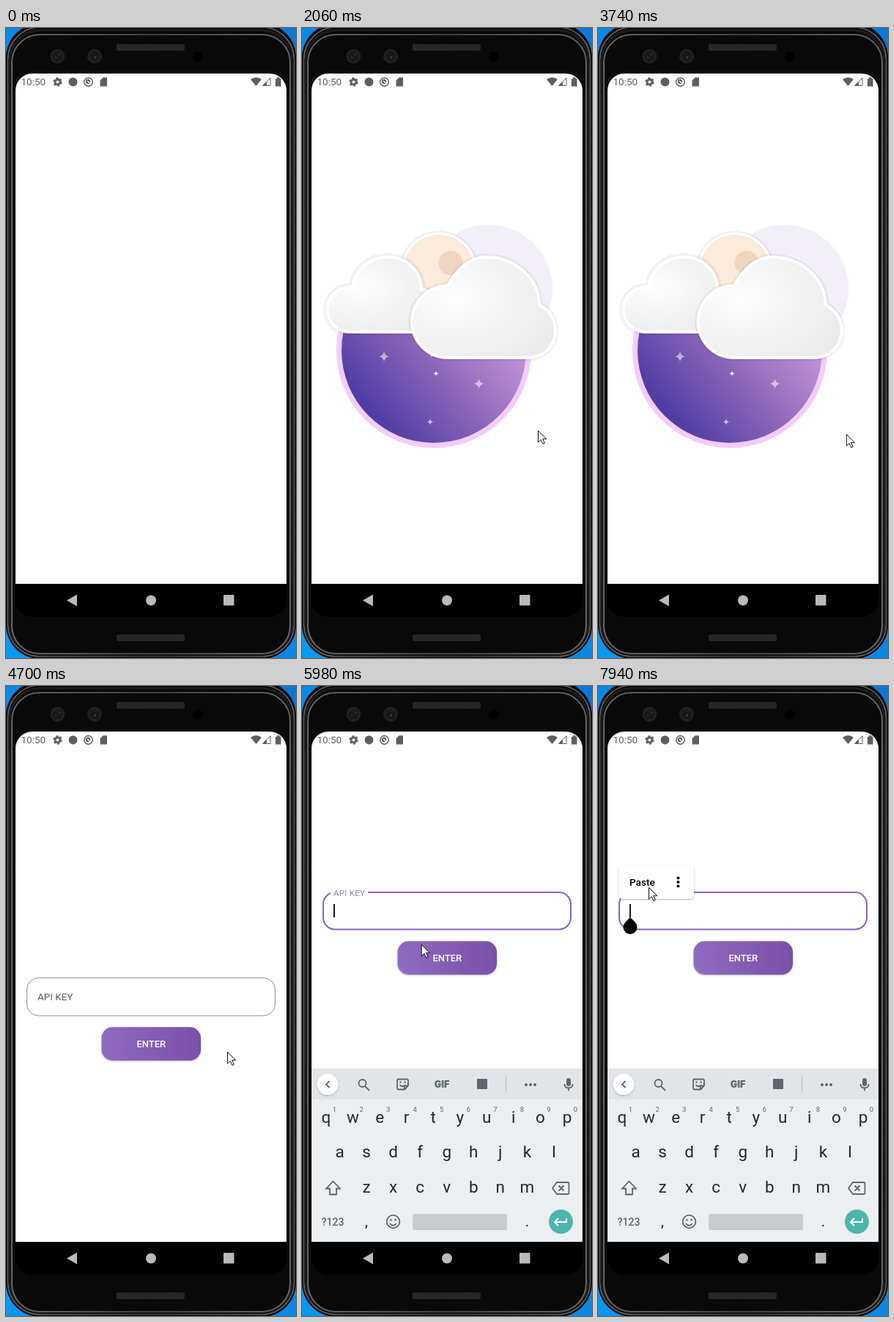
Write an HTML page that moves like this. It is 396 px wide and 858 px high and loops after 8 s.

```html
<!DOCTYPE html>
<html lang="en">
<head>
<meta charset="utf-8">
<style>
  html, body { margin: 0; width: 100%; height: 100%; overflow: hidden; background: #0878d4; }
  svg { display: block; width: 100vw; height: 100vh; font-family: Roboto, sans-serif; }
  .line { fill: none; stroke: #5b676d; stroke-width: 1.8; }
  .mid { text-anchor: middle; }
  .halo { fill: none; stroke: #1c1c40; stroke-opacity: .06; }
</style>
</head>
<body>
<svg viewBox="0 0 396 858">
  <defs>
    <linearGradient id="desk" x1="0" y1="1" x2="1" y2="0"><stop stop-color="#0a98ee"/><stop offset="1" stop-color="#0a78d8"/></linearGradient>
    <linearGradient id="sky" gradientUnits="userSpaceOnUse" x1="95" y1="545" x2="275" y2="395">
      <stop stop-color="#4838a1"/><stop offset=".5" stop-color="#8a66b9"/><stop offset="1" stop-color="#c797d9"/>
    </linearGradient>
    <linearGradient id="violet"><stop stop-color="#8e6bc0"/><stop offset="1" stop-color="#7a50a9"/></linearGradient>
    <radialGradient id="puff" cx=".3" cy=".4" r=".75"><stop stop-color="#fefefe"/><stop offset="1" stop-color="#ebebeb"/></radialGradient>
    <linearGradient id="rim"><stop stop-color="#666"/><stop offset=".5" stop-color="#3c3c3c"/><stop offset="1" stop-color="#666"/></linearGradient>
    <linearGradient id="tail" x1="0" y1="1" x2="1" y2="0"><stop stop-color="#fff" stop-opacity=".1"/><stop offset="1" stop-color="#fff" stop-opacity=".3"/></linearGradient>
    <pattern id="mesh" width="3" height="3" patternUnits="userSpaceOnUse">
      <path fill="#2b2b2b" d="M0 0h3v3h-3z"/><path fill="#171717" d="M0 0h1v1h-1zM1.5 1.5h1v1h-1z"/>
    </pattern>
    <filter id="shadow" x="-10%" y="-20%" width="120%" height="150%"><feDropShadow dx="0" dy="1" stdDeviation="1.2" flood-opacity=".3"/></filter>
    <clipPath id="screen"><rect x="13" y="62" width="370" height="740" rx="23"/></clipPath>
    <path id="front" d="M195 449A49 49 0 0 1 195 351C208 327 226 312 247 312C288 312 320 342 320 377C333 384 342 396 342 412A37 37 0 0 1 305 449Z"/>
    <path id="back" d="M65 414A30.5 30.5 0 0 1 65 353H69C72 329 92 312 117 312C143 312 163 332 163 355C178 360 184 372 184 384A30 30 0 0 1 154 414Z"/>
    <path id="star" fill="#fff" d="M0-7Q1-1 7 0Q1 1 0 7Q-1 1-7 0Q-1-1 0-7"/>
  </defs>

  <!-- phone body -->
  <rect width="396" height="858" fill="url(#desk)"/>
  <rect x="0" y="-6" width="396" height="865" rx="46" fill="#080808"/>
  <g fill="none">
    <rect x="2.5" y="-1" width="391" height="857" rx="44" stroke="url(#rim)" stroke-width="1.5"/>
    <rect x="5" y="3" width="386" height="850" rx="42" stroke="#1c1c1c" stroke-width="3"/>
    <rect x="8" y="9" width="380" height="843" rx="38" stroke="url(#rim)" stroke-width="2"/>
  </g>
  <rect x="10" y="11" width="376" height="840" rx="36" fill="#090909"/>
  <g fill="url(#mesh)"><rect x="151" y="22" width="93" height="9" rx="2"/><rect x="151" y="826" width="93" height="9" rx="2"/></g>
  <g fill="#202020"><circle cx="70.5" cy="38.5" r="10"/><circle cx="121" cy="38.5" r="10"/></g>
  <g fill="#181818"><circle cx="70.5" cy="38.5" r="6.5"/><circle cx="121" cy="38.5" r="6.5"/></g>
  <g fill="#444"><circle cx="68" cy="40" r="1.1"/><circle cx="73" cy="36" r="1"/><circle cx="122" cy="40" r="1.4"/></g>
  <circle cx="262" cy="39" r="7"/>

  <g clip-path="url(#screen)">
    <path d="M13 62h370v740h-370z"/>
    <path fill="#fff" d="M13 62h370v695h-370z"/>

    <!-- status bar -->
    <g fill="#5e5f61">
      <text x="20.5" y="78.3" font-size="13.5">10:50</text>
      <circle cx="70.5" cy="73.5" r="3.5" fill="none" stroke="#5e5f61" stroke-width="3"/>
      <circle cx="70.5" cy="73.5" r="5.3" fill="none" stroke="#5e5f61" stroke-width="1.8" stroke-dasharray="2.775"/>
      <circle cx="91.5" cy="73.5" r="6"/>
      <circle cx="112.5" cy="73.5" r="5.7" fill="none" stroke="#5e5f61" stroke-width="1.5"/>
      <circle cx="112" cy="73" r="3.2"/>
      <path d="M111 72l5 5" stroke="#fff" stroke-width="1.2"/>
      <path d="M132.500 67.500h5.500v12h-9.500v-8zM334 70Q341.500 64.500 349 70L341.500 79Z"/>
      <path fill="none" stroke="#5e5f61" d="M350.500 78.500H361V68Z"/><path d="M350 79h6v-6z"/>
      <path d="M368 69h2v-1.700h3.500v1.700h2v10.500h-7.500z"/>
    </g>

    <!-- splash picture -->
    <g id="splash">
      <circle cx="255" cy="355" r="87" fill="#f2eff9"/>
      <circle cx="180" cy="439" r="133" fill="#f3ccfb"/>
      <circle cx="180" cy="439" r="126" fill="url(#sky)"/>
      <circle id="pulse" cx="183" cy="432" r="119" fill="#fff"/>
      <path id="meteor" fill="url(#tail)" d="M-5 8L14-11L12-4L2 4Z"/>
      <g id="stars"></g>
      <circle class="halo" cx="187" cy="330" r="52.500" stroke-width="3"/>
      <circle cx="187" cy="330" r="51.500" fill="#fff"/>
      <circle cx="187" cy="330" r="48.500" fill="#fbebdc"/>
      <circle cx="203" cy="320" r="16.500" fill="#eed6c0"/>
      <circle cx="155" cy="340" r="8" fill="#eed6c0"/>
      <g><use href="#back" class="halo" stroke-width="11"/><use href="#back" fill="url(#puff)" stroke="#fff" stroke-width="4"/></g>
      <g id="cloud"><use href="#front" class="halo" stroke-width="9"/><use href="#front" fill="url(#puff)" stroke="#fff" stroke-width="4"/></g>
    </g>

    <!-- key form -->
    <g id="form">
      <rect id="field" rx="16"/>
      <rect id="gap" x="39" y="394" width="51" height="7" fill="#fff"/>
      <text id="label" x="43">API KEY</text>
      <rect x="130.500" y="464.500" width="135.500" height="45.500" rx="15" fill="url(#violet)" filter="url(#shadow)"/>
      <text class="mid" x="198.300" y="492" font-size="13" font-weight="500" fill="#fff">ENTER</text>
    </g>
    <rect id="caret" x="43" y="297" width="1.800" height="18"/>
    <path id="handle" d="M44 315L51 322A9.500 9.500 0 1 1 37 322Z"/>
    <g id="popup">
      <rect x="28" y="244" width="103" height="46" rx="6" fill="#fff" filter="url(#shadow)"/>
      <text x="43" y="272" font-size="13.600" font-weight="500">Paste</text>
      <circle cx="109.500" cy="261.500" r="2"/><circle cx="109.500" cy="267" r="2"/><circle cx="109.500" cy="272.500" r="2"/>
    </g>

    <!-- keyboard -->
    <g id="keyboard">
      <path fill="#fff" d="M13 521h370v236h-370z"/>
      <g id="keys">
        <path fill="#eceff1" d="M13 521h370v236h-370z"/><path fill="#e1e5e8" d="M13 521h370v42h-370z"/>
        <circle cx="35" cy="542.500" r="14.500" fill="#fff" filter="url(#shadow)"/>
        <path class="line" d="M37.500 538l-4.500 4.500l4.500 4.500"/>
        <g class="line">
          <circle cx="82.500" cy="541" r="5"/><path d="M86 545l6 6"/>
          <path d="M132 535.500h11q2 0 2 2v7l-5 5h-8q-2 0-2-2v-10q0-2 2-2zM140 549.500v-5h5M133.500 543q3 4 6 1"/>
          <path d="M278.500 532v20" opacity=".2"/>
          <path d="M358.500 542q0 5.500 5.500 5.500t5.500-5.500M364 547.500v4"/>
          <path d="M42.500 674.500l9.500 10h-5v8h-9v-8h-5zM348 676h15q1.500 0 1.500 1.500v13q0 1.500-1.500 1.500h-15l-6-8zM350.500 680.500l7 7m0-7l-7 7"/>
          <circle cx="124.500" cy="729.500" r="8.800"/><path d="M120 732q4.500 5.500 9 0"/>
        </g>
        <g fill="#5b676d">
          <circle cx="134.500" cy="539.500" r="1.200"/><circle cx="140.500" cy="539.500" r="1.200"/>
          <text class="mid" x="191" y="547" font-family="Inter, sans-serif" font-size="12.500" font-weight="900">GIF</text>
          <rect x="239" y="535" width="14" height="14"/>
          <circle cx="306" cy="543" r="2"/><circle cx="312" cy="543" r="2"/><circle cx="318" cy="543" r="2"/>
          <rect x="361" y="534" width="6" height="11" rx="3"/>
          <circle cx="121.500" cy="727" r="1.300"/><circle cx="127.500" cy="727" r="1.300"/>
          <text class="mid" x="42" y="735" font-size="14" font-weight="500">?123</text>
        </g>
        <rect x="151" y="719" width="129" height="22" rx="2" fill="#c8ccce"/>
        <circle cx="353.500" cy="729.500" r="16.500" fill="#4db6ac"/>
        <path fill="none" stroke="#fff" stroke-width="2" d="M361 725v5h-15.500M350 725l-5 5l5 5"/>
        <g id="letters" class="mid" fill="#1b2b32"></g>
      </g>
    </g>

    <!-- navigation bar -->
    <path id="shade" fill-opacity=".33"/>
    <g fill="#bababa"><path d="M83 779.500l14-8v16z"/><circle cx="198" cy="779.500" r="7"/><rect x="297" y="772" width="14.500" height="14.500" rx="1"/></g>
  </g>
  <circle id="click" r="15" fill="#fcf97c"/>
  <path id="cursor" fill="#fff" stroke="#111" d="M.5.500V16.200L4.200 12.700L7 18.500L9.300 17.500L6.700 11.700H11.700Z"/>
</svg>

<script>
const LOOP = 8000;
const $ = id => document.getElementById(id);
const set = (id, attrs) => { for (const k in attrs) $(id).setAttribute(k, attrs[k]); };
const show = (id, on) => set(id, { visibility: on ? 'visible' : 'hidden' });
const move = (id, x, y) => set(id, { transform: `translate(${x} ${y})` });
const ramp = (t, a, b) => Math.min(1, Math.max(0, (t - a) / (b - a)));
const smooth = p => p * p * (3 - 2 * p);
const mix = (a, b, p) => a + (b - a) * p;
const within = (t, ...spans) => spans.some(([a, b]) => t >= a && t < b);

const glyph = (c, x, y, size) => `<text x="${x}" y="${y}" font-size="${size}">${c}</text>`;
const row = (chars, x, y, size) => [...chars].map((c, i) => glyph(c, x + i * 36.55, y, size)).join('');
$('letters').innerHTML =
  row('qwertyuiop', 33, 595, 22.5) + row('asdfghjkl', 51.5, 642, 22.5) + row('zxcvbnm', 88, 690, 22.5) +
  row(',', 88, 736, 20) + row('.', 307.5, 736, 20) +
  `<g fill="#5b676d">${row('1234567890', 44.5, 580, 9.5)}</g>`;

// x, y, size, opacity
const stars = [[112, 447.5, 1, 0.55], [183, 470.5, 0.5, 1], [241.5, 484.5, 1, 0.55], [175, 536.5, 0.8, 0.6], [177, 446, 0.35, 0.8]];
$('stars').innerHTML = stars.map(([x, y, s, o]) =>
  `<use href="#star" transform="translate(${x} ${y}) scale(${s})" opacity="${o}"/>`).join('');
const twinkler = $('stars').children[3];

// time, x, y
const path = [
  [460, 330, 661], [1150, 311, 545], [1290, 311, 545], [2000, 322, 548], [2970, 322, 548],
  [3700, 338, 553], [3900, 346, 553], [4640, 346, 553], [4700, 302, 498], [4960, 240, 378],
  [5170, 218, 417], [5650, 218, 417], [6200, 133, 316.5], [7470, 133, 316.5], [7930, 69, 274]
];

function pointer(t) {
  const i = path.findIndex(k => k[0] > t);
  if (i < 1) return path[i < 0 ? path.length - 1 : 0].slice(1);
  const [a, b] = [path[i - 1], path[i]], p = smooth(ramp(t, a[0], b[0]));
  return [mix(a[1], b[1], p), mix(a[2], b[2], p)];
}

function drawSplash(t) {
  show('splash', within(t, [460, 4100]));
  set('splash', { opacity: 1 - ramp(t, 3780, 4100) });
  move('cloud', -4 + 10.5 * Math.cos((t - 1720) * 0.00207), 0);
  set('pulse', { opacity: 0.1 * ramp(t, 2100, 2850) * (1 - ramp(t, 2950, 3700)) });
  const fall = ramp(t, 2600, 3050);
  move('meteor', mix(143, 62, fall), mix(463, 544, fall));
  set('meteor', { opacity: Math.sin(Math.PI * fall) });
  const size = 0.62 - 0.19 * Math.cos((t - 1150) * Math.PI / 1750);
  twinkler.setAttribute('transform', `translate(175 536.5) scale(${size})`);
}

function drawForm(t) {
  const focused = t >= 5440, float = smooth(ramp(t, 5440, 5570));
  show('form', t >= 3780);
  set('form', { opacity: ramp(t, 3780, 4100) });
  move('form', 0, t >= 5570 ? -117 : 0);
  const inset = focused ? 0.5 : 0;
  set('field', {
    x: 28.5 + inset, y: 397.5 + inset, width: 339 - 2 * inset, height: 51.5 - 2 * inset,
    fill: '#fff', stroke: focused ? '#8a65bd' : '#8d8d8d', 'stroke-width': focused ? 2 : 1
  });
  show('gap', focused);
  const grey = ramp(t, 5620, 6050);
  set('label', {
    y: mix(428, 402.5, float), 'font-size': mix(13.4, 11.5, float), 'letter-spacing': 0.25 * float,
    fill: focused ? `rgb(${mix(138, 148, grey)},${mix(101, 132, grey)},${mix(189, 178, grey)})` : '#5c5b70'
  });
  show('caret', within(t, [5550, 6050], [6450, 6990], [7200, LOOP]));
  show('handle', t >= 7200);
  show('popup', t >= 7470);
}

function drawKeyboard(t) {
  const rise = ramp(t, 5600, 5880), offset = 27 * (1 - rise) ** 2;
  show('keyboard', t >= 5570);
  move('keyboard', 0, offset);
  set('keys', { opacity: mix(0.72, 1, rise) });
  show('shade', t >= 5570 && offset > 0);
  set('shade', { d: `M13 757h370v${offset}h-370z` });
}

function frame(now) {
  const t = now % LOOP, [x, y] = pointer(t);
  drawSplash(t);
  drawForm(t);
  drawKeyboard(t);
  move('cursor', x, y);
  move('click', x, y);
  show('cursor', within(t, [460, 4100], [4300, LOOP]));
  show('click', within(t, [5440, 5570], [6250, 6450], [7000, 7200]));
  requestAnimationFrame(frame);
}
requestAnimationFrame(frame);
</script>
</body>
</html>
```
